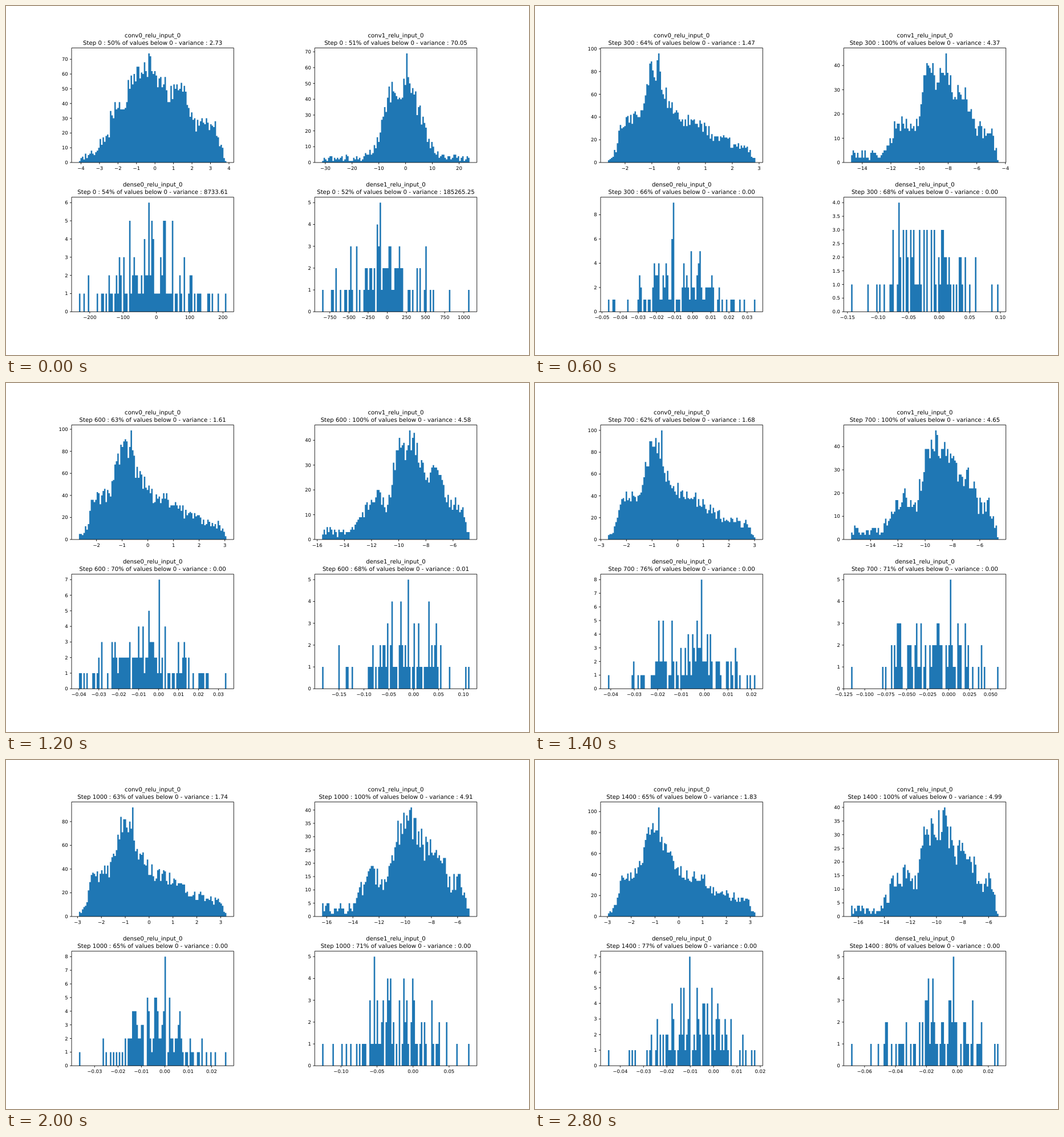
An HTML page that plays this animation: 917x611 px, repeating every 3000 ms.

```html
<!DOCTYPE html>
<html lang="en">
<head>
<meta charset="utf-8">
<title>Activation histograms</title>
<style>
  html, body { margin: 0; width: 100%; height: 100%; overflow: hidden; background: #fff; }
  svg { display: block; width: 917px; height: 611px; font: 8.49px "DejaVu Sans", sans-serif; text-rendering: geometricPrecision; }
  .title { font-size: 10.19px; }
  .bars { fill: #1f77b4; }
  .axes { fill: none; stroke: #000; stroke-width: .85; }
</style>
</head>
<body>
<svg id="stage" viewBox="0 0 917 611"></svg>
<script>
const BINS = 100, WIDTH = 284.35, HEIGHT = 200.6, MARGIN = 1 / 22;
const STEP_MS = 200, STEPS = 15;

// Measurements at one training step; the tallest bar is `max` high and stands in bin `peak`.
const key = (step, below, variance, lo, hi, peak, max) => ({ step, below, variance, lo, hi, peak, max });

// Convolution panels follow outlines of [bin, share of max]; dense panels draw normal samples.
const panels = [
  {
    name: 'conv0', x: 115, y: 73.4,
    start: [[0, .03], [10, .1], [20, .25], [22, .45], [30, .52], [38, .85], [50, .87], [60, .65], [72, .63], [78, .36], [92, .35], [100, 0]],
    trained: [[0, .02], [5, .1], [9, .35], [21, .42], [29, .84], [34, .84], [40, .58], [51, .39], [64, .35], [72, .24], [95, .13], [100, .02]],
    keys: [
      key(0, 50, 2.73, -4.11, 3.86, 47, 74),
      key(300, 64, 1.47, -2.638, 2.862, 34, 96),
      key(500, 63, 1.55, -2.643, 3.089, 33, 98),
      key(700, 62, 1.68, -2.722, 3.033, 36, 100),
      key(1000, 63, 1.74, -2.94, 3.239, 36, 92),
      key(1200, 65, 2.11, -3.101, 3.429, 33, 86),
      key(1400, 65, 1.83, -2.976, 3.216, 34, 104),
    ],
  },
  {
    name: 'conv1', x: 541.3, y: 73.4,
    start: [[0, .04], [27, .04], [35, .12], [40, .3], [46, .65], [60, .72], [65, .5], [72, .2], [80, .07], [100, .03]],
    trained: [[0, .08], [21, .07], [25, .2], [33, .38], [45, .33], [51, .8], [62, .84], [70, .62], [82, .55], [86, .3], [94, .32], [100, .02]],
    keys: [
      key(0, 51, 70.05, -31.2, 23.9, 57, 69),
      key(300, 100, 4.37, -14.78, -4.482, 64, 45),
      key(500, 100, 4.52, -15.857, -4.95, 61, 41),
      key(700, 100, 4.65, -15.424, -4.626, 57, 47),
      key(1000, 100, 4.91, -16.353, -5.089, 60, 41),
      key(1200, 100, 5.47, -16.89, -5.141, 51, 41),
      key(1400, 100, 4.99, -16.55, -5.239, 63, 40),
    ],
  },
  {
    name: 'dense0', x: 115, y: 334.7, samples: 120,
    keys: [
      key(0, 54, 8733.61, -232.5, 210.3, 47, 6),
      key(300, 66, 0, -.0467, .03456, 44, 9),
      key(500, 64, 0, -.0387, .04624, 44, 5),
      key(700, 76, 0, -.0412, .0217, 63, 8),
      key(1000, 65, 0, -.0367, .02634, 58, 8),
      key(1200, 73, 0, -.04234, .02123, 50, 5),
      key(1400, 77, 0, -.04525, .01792, 55, 7),
    ],
  },
  {
    name: 'dense1', x: 541.3, y: 334.7, samples: 84,
    keys: [
      key(0, 52, 185265.25, -851, 1073.7, 39, 5),
      key(300, 68, 0, -.144, .0971, 32, 4),
      key(500, 65, .01, -.2518, .1652, 49, 5),
      key(700, 71, 0, -.1163, .05945, 67, 5),
      key(1000, 71, 0, -.1262, .0784, 35, 5),
      key(1200, 74, 0, -.1007, .0593, 26, 4),
      key(1400, 80, 0, -.0687, .0266, 69, 5),
    ],
  },
];

const mix = (a, b, t) => a + (b - a) * t;

function seededRandom(seed) {
  return () => {
    seed = seed + 0x6D2B79F5 | 0;
    let t = Math.imul(seed ^ seed >>> 15, 1 | seed);
    t ^= t + Math.imul(t ^ t >>> 7, 61 | t);
    return ((t ^ t >>> 14) >>> 0) / 2 ** 32;
  };
}

// Steps between two keys are blended; training settles right after step 0.
function stateAt({ keys }, step) {
  const next = keys.find(k => k.step >= step);
  let prev = keys.filter(k => k.step <= step).pop();
  if (prev.step === 0) prev = next;
  const t = (step - prev.step) / (next.step - prev.step || 1);
  const state = {};
  for (const field in next) state[field] = mix(prev[field], next[field], t);
  return { ...state, step, peak: Math.round(state.peak), max: Math.round(state.max) };
}

function outlineCounts(outline, max, random) {
  return Array.from({ length: BINS }, (_, bin) => {
    const i = outline.findIndex(([end]) => end > bin);
    const [[x0, h0], [x1, h1]] = [outline[i - 1], outline[i]];
    const height = max * mix(h0, h1, (bin + .5 - x0) / (x1 - x0));
    return Math.max(1, Math.round(height + (random() - .5) * 2.2 * Math.sqrt(height)));
  });
}

// The mean lies so that the stated share of the samples falls below zero.
function sampleCounts(samples, { lo, hi, below }, random) {
  const counts = Array(BINS).fill(0), spread = 18;
  const zero = -lo / (hi - lo) * BINS;
  const mean = zero - spread * (below - 50) / 38;
  for (let n = 0; n < samples; n++) {
    const normal = (random() + random() + random() + random() - 2) * Math.sqrt(3);
    const bin = Math.floor(mean + spread * normal);
    if (bin > 0 && bin < BINS - 1) counts[bin]++;
  }
  counts[0] = counts[BINS - 1] = 1;
  return counts;
}

function countsAt(panel, state) {
  const random = seededRandom(state.step + panel.x * 10 + panel.y);
  const counts = panel.samples
    ? sampleCounts(panel.samples, state, random)
    : outlineCounts(state.step ? panel.trained : panel.start, state.max, random);
  return counts.map((count, bin) => bin === state.peak ? state.max : Math.min(count, state.max - 1));
}

function ticks(from, to) {
  const raw = (to - from) / 9, power = 10 ** Math.floor(Math.log10(raw));
  const step = +([1, 2, 2.5, 5, 10].find(m => m * power >= raw) * power).toPrecision(4);
  const decimals = (String(step).split('.')[1] || '').length;
  const list = [];
  for (let n = Math.ceil(from / step); n * step <= to; n++) {
    const label = Math.abs(n * step).toFixed(decimals);
    list.push({ value: n * step, label: (n < 0 ? '−' : '') + label });
  }
  return list;
}

const text = (x, y, content, anchor = 'middle', style = '') =>
  `<text x="${x}" y="${y}" text-anchor="${anchor}" class="${style}">${content}</text>`;

function drawPanel(panel, step) {
  const { x, y, name } = panel, bottom = y + HEIGHT, center = x + WIDTH / 2;
  const state = stateAt(panel, step), { lo, hi, below, variance } = state;
  const pad = (hi - lo) * .05, top = state.max * 1.05;
  const left = x + WIDTH * MARGIN, binWidth = WIDTH * (1 - 2 * MARGIN) / BINS;
  const toX = v => x + (v - lo + pad) / (hi - lo + 2 * pad) * WIDTH;
  const toY = v => bottom - v / top * HEIGHT;

  const bars = countsAt(panel, state)
    .map((count, i) => `V${toY(count)}H${left + (i + 1) * binWidth}`).join('');
  let axes = `M${x} ${y}h${WIDTH}v${HEIGHT}h${-WIDTH}z`, labels = '';
  for (const { value, label } of ticks(lo - pad, hi + pad)) {
    axes += `M${toX(value)} ${bottom}v3`;
    labels += text(toX(value), bottom + 12.6, label);
  }
  for (const { value, label } of ticks(0, top)) {
    axes += `M${x} ${toY(value)}h-3`;
    labels += text(x - 6.3, toY(value) + 3, label, 'end');
  }
  const summary = `Step ${step} : ${Math.round(below)}% of values below 0 - variance : ${variance.toFixed(2)}`;
  return `<path class="bars" d="M${left} ${bottom}${bars}V${bottom}z"/><path class="axes" d="${axes}"/>` + labels +
    text(center, y - 18.5, `${name}_relu_input_0`, 'middle', 'title') +
    text(center, y - 5.6, summary, 'middle', 'title');
}

const stage = document.getElementById('stage');
let shown = -1;
function play() {
  const step = Math.floor(performance.now() / STEP_MS) % STEPS * 100;
  if (step !== shown) {
    stage.innerHTML = panels.map(panel => drawPanel(panel, step)).join('');
    shown = step;
  }
  requestAnimationFrame(play);
}
play();
</script>
</body>
</html>
```
